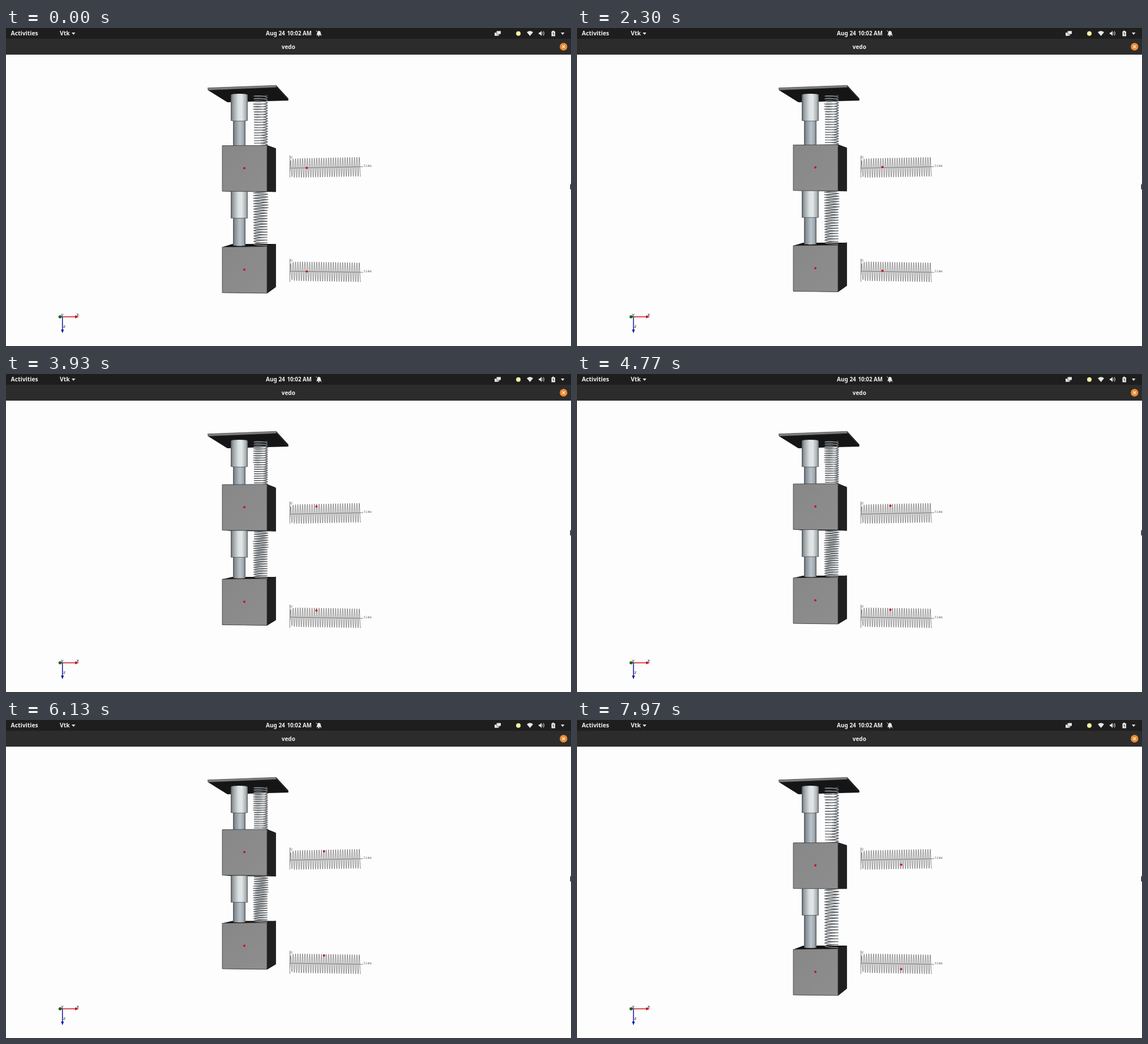
Write an HTML page that moves like this. It is 998x561 px and loops after 8 s.

```html
<!DOCTYPE html>
<html lang="en">
<head>
<meta charset="utf-8">
<title>Coupled springs</title>
<style>
  html, body { margin: 0; width: 100%; height: 100%; overflow: hidden; background: #fcfdfc; }
  svg { display: block; width: 100%; height: 100%; }
  .bar { font: 600 10.4px "Noto Sans", "Open Sans", sans-serif; fill: #f0f0f0; white-space: pre; }
  .axis { font: 6px "DejaVu Sans Mono", monospace; fill: #666; }
  .gizmo { font: 7.5px "DejaVu Sans", sans-serif; fill: #222; }
</style>
</head>
<body>
<svg viewBox="0 0 998 561" preserveAspectRatio="none">
  <defs>
    <linearGradient id="outer">
      <stop offset="0" stop-color="#4f5457"/>
      <stop offset=".12" stop-color="#929a9c"/>
      <stop offset=".45" stop-color="#dbe1e2"/>
      <stop offset=".65" stop-color="#e1e6e7"/>
      <stop offset=".9" stop-color="#a5adaf"/>
      <stop offset="1" stop-color="#5c6265"/>
    </linearGradient>
    <linearGradient id="inner">
      <stop offset="0" stop-color="#50565b"/>
      <stop offset=".15" stop-color="#858e94"/>
      <stop offset=".55" stop-color="#bac3c9"/>
      <stop offset=".85" stop-color="#9da6ac"/>
      <stop offset="1" stop-color="#545b60"/>
    </linearGradient>
    <linearGradient id="face" x2="1" y2="1">
      <stop offset="0" stop-color="#878787"/>
      <stop offset="1" stop-color="#8e8e8e"/>
    </linearGradient>
  </defs>
  <rect width="998" height="561" fill="#fcfdfc"/>

  <!-- desktop bar and window title -->
  <rect width="998" height="47" fill="#2d2c2c"/>
  <rect width="998" height="19" fill="#1f1e1e"/>
  <g class="bar">
    <text x="8.5" y="13">Activities</text>
    <text x="95" y="13">Vtk</text>
    <text x="459" y="13" font-size="10" style="font-size:10px">Aug 24</text>
    <text x="496.5" y="13" style="font-size:9.7px">10:02 AM</text>
    <text x="498.8" y="36.5" text-anchor="middle" style="font-size:10px">vedo</text>
  </g>
  <g fill="#e8e8e8">
    <path d="M116 8h6.5l-3.25 4zM980 8h6.5l-3.25 4z"/>
    <path d="M548 12.5c2-1 1-6 4-7.5 3-.5 4 2 4 4l1 3.500z"/>
    <circle cx="552.3" cy="13.600" r="1.200"/>
    <path d="M866 5.500h8v2h-2v4h-4v2.500h-5v-6h3z" opacity=".55"/>
    <path d="M867.500 5.500h6.500v5h-6.500zM863 8.500h3.500v3h4v2h-7.500z"/>
    <path d="M920 7.500q5.500-4.500 11 0l-5.500 6.500z"/>
    <path d="M941 8h2l3-3v9l-3-3h-2z"/>
    <path d="M963.500 6h1.500v-1.300h3v1.300h2v8.500h-6.500z"/>
  </g>
  <g fill="none" stroke="#e8e8e8">
    <path d="M547.500 4.500l10 9.500"/>
    <path d="M947.500 7q1.500 2.500 0 5M949.300 5.500q2.700 4 0 8" stroke-width=".9"/>
    <path d="M967 7.500l-1 2.500h2l-1 2.500" stroke="#333" stroke-width=".9"/>
  </g>
  <circle cx="905" cy="9.700" r="4" fill="#fbf3a0"/>
  <circle cx="984.800" cy="33" r="6.700" fill="#e98c33"/>
  <path d="M982.500 30.700l4.600 4.600m0-4.600l-4.600 4.600" stroke="#fff" stroke-width="1.200"/>
  <path d="M998 274l-1.400 3v7l1.400 1.500z" fill="#111"/>

  <!-- orientation axes -->
  <g class="gizmo">
    <path d="M97 509.500h26" stroke="#c4101c" stroke-width="1.500"/>
    <path d="M122 506.800l6.500 2.700-6.500 2.700z" fill="#c4101c"/>
    <path d="M99.700 510v23" stroke="#1010a8" stroke-width="1.500"/>
    <path d="M97.200 532h5l-2.500 6.500z" fill="#1010a8"/>
    <circle cx="95.500" cy="509.500" r="2.700" fill="#0a6a1c"/>
    <text x="97" y="507.500">y</text>
    <text x="124.500" y="507.500">x</text>
    <text x="101" y="528.500">z</text>
  </g>

  <!-- ceiling plate -->
  <path d="M356.500 109.500L477.500 104.500 498.500 124.500V128L391 131z" fill="#151515"/>
  <path d="M356.500 105.700L477.500 101.200V104.700L357 109.700z" fill="#808080" stroke="#333" stroke-width=".7"/>
  <path d="M477.500 101.200L498.500 124V128L477.500 105z" fill="#222"/>

  <g id="plots"></g>
  <g id="rig"></g>
</svg>
<script>
const NS = "http://www.w3.org/2000/svg";
const LOOP = 8000, FRAME = 100 / 3;
const HORIZON = 300, COILS = 20;
const PEAK_X = 536.4, WAVE = 4.17, AMP = 17;

// [ms, oscillations], including the stalls near the start
const PACE = [[0, -1.25], [1300, 0], [1400, 0], [1430, 0.08], [1570, 0.08], [1670, 0.2],
  [1830, 0.22], [3130, 1.72], [4770, 4.1], [6130, 6.08], [7270, 7.625], [8000, 8.705]];

const rig = document.getElementById("rig");
const plots = document.getElementById("plots");

function add(parent, tag, attrs, text) {
  const el = document.createElementNS(NS, tag);
  for (const k in attrs) el.setAttribute(k, attrs[k]);
  if (text) el.textContent = text;
  parent.appendChild(el);
  return el;
}
const shape = attrs => add(rig, "path", attrs);
const dot = parent => add(parent, "circle", { r: 2, fill: "#cb0a1c" });
const poly = pts => "M" + pts.map(p => p[0] + " " + p[1].toFixed(2)).join("L") + "Z";

// Half height of a level circle of radius r seen at height y
const tilt = (r, y) => r * (HORIZON - y) * 0.00074;

const backTop = y => 212.5 + 0.944 * (y - 207);
const backBottom = y => 289 + 0.9356 * (y - 288.5);

function makePlot(mid, slope, axisTop, axisBottom, labelY) {
  const midAt = x => mid + slope * (x - 564);
  let d = "";
  for (let x = 501.5; x <= 626.5; x += 0.2) {
    const grow = 1 - 0.4 * Math.exp((501 - x) / 3);
    const y = midAt(x) - AMP * grow * Math.cos(2 * Math.PI * (x - PEAK_X) / WAVE);
    d += (d ? "L" : "M") + x.toFixed(1) + " " + y.toFixed(2);
  }
  add(plots, "path", { d, fill: "none", stroke: "#505050", "stroke-width": 0.65 });
  add(plots, "path", {
    d: `M501.500 ${axisTop}V${axisBottom}M501.500 ${midAt(501)}L631 ${midAt(631)}`,
    fill: "none", stroke: "#666", "stroke-width": 0.8
  });
  add(plots, "text", { class: "axis", x: 502.2, y: axisTop + 5 }, "U");
  add(plots, "text", { class: "axis", x: 631.5, y: labelY }, "time");
  return { dot: dot(plots), midAt };
}

function makeBlock() {
  return {
    under: shape({ fill: "#151515" }),
    lid: shape({ fill: "#101010" }),
    side: shape({ fill: "#202020", stroke: "#111", "stroke-width": 0.7 })
  };
}

function makeLink() {
  return {
    rod: shape({ fill: "url(#inner)" }),
    sleeve: shape({ fill: "url(#outer)" }),
    rim: shape({ fill: "none", stroke: "#4c5255", "stroke-width": 0.9 }),
    wire: shape({ fill: "none", stroke: "#4b4f53", "stroke-width": 1.5 }),
    shine: shape({ fill: "none", stroke: "#c3c8cc", "stroke-width": 0.7 })
  };
}

function makeFront() {
  return {
    face: shape({ fill: "url(#face)", stroke: "#3a3a3a", "stroke-width": 0.8 }),
    dot: dot(rig)
  };
}

function tube(x, r, top, bottom) {
  const bend = y => 1.33 * tilt(r, y);
  return `M${x - r} ${top}C${x - r} ${top - bend(top)} ${x + r} ${top - bend(top)} ${x + r} ${top}` +
    `V${bottom}C${x + r} ${bottom + Math.abs(bend(bottom))} ${x - r} ${bottom + Math.abs(bend(bottom))} ${x - r} ${bottom}Z`;
}

function coil(top, bottom, litOnly) {
  const n = 16;
  let d = "", pen = false;
  for (let i = 0; i <= COILS * n; i++) {
    const a = i / n * 2 * Math.PI;
    const lit = Math.sin(a) < 0.15;
    if (litOnly && !lit) { pen = false; continue; }
    const base = top + (bottom - top) * i / (COILS * n);
    const x = 449.9 + 11.8 * Math.cos(a);
    const y = base + tilt(12, base) * Math.sin(a);
    d += (pen ? "L" : "M") + x.toFixed(1) + " " + y.toFixed(2);
    pen = true;
  }
  return d;
}

function setBlock(block, front, y, skew) {
  const tl = y - 39.7, tr = tl - skew, bl = y + 40.7, br = bl + skew;
  const bt = backTop(tr), bb = backBottom(br);
  block.lid.setAttribute("d", poly([[382, tl], [400, bt], [476.5, bt], [461, tr]]));
  block.under.setAttribute("d", poly([[382, bl], [400, bb - 0.3], [476.5, bb], [461, br]]));
  block.side.setAttribute("d", poly([[461, tr], [476.5, bt], [476.5, bb], [461, br]]));
  front.face.setAttribute("d", poly([[382, tl], [461, tr], [461, br], [382, bl]]));
  front.dot.setAttribute("cx", 421);
  front.dot.setAttribute("cy", y);
  return { top: (tl + bt) / 2, bottom: (bl + bb) / 2 };
}

function setLink(link, top, bottom, sleeveEnd) {
  link.rod.setAttribute("d", tube(412, 11, sleeveEnd - 3, bottom));
  link.sleeve.setAttribute("d", tube(412, 15, top, sleeveEnd));
  const bend = 1.33 * Math.abs(tilt(15, sleeveEnd));
  link.rim.setAttribute("d", `M397 ${sleeveEnd}c0 ${bend} 30 ${bend} 30 0`);
  link.wire.setAttribute("d", coil(top, bottom, false));
  link.shine.setAttribute("d", coil(top, bottom, true));
}

const plotA = makePlot(246, -0.02, 225, 264, 245.3);
const plotB = makePlot(430, 0.016, 407, 448, 431.3);
const blockA = makeBlock(), blockB = makeBlock();
const linkA = makeLink(), linkB = makeLink();
const frontA = makeFront(), frontB = makeFront();

function phaseAt(t) {
  let i = 1;
  while (i < PACE.length - 1 && t > PACE[i][0]) i++;
  const [t0, p0] = PACE[i - 1], [t1, p1] = PACE[i];
  return p0 + (p1 - p0) * (t - t0) / (t1 - t0);
}

function draw(ms) {
  const t = Math.floor((ms + 4) / FRAME) * FRAME;
  const p = phaseAt(t);
  const lift = AMP * Math.cos(2 * Math.PI * p);
  const a = setBlock(blockA, frontA, 247.3 - 0.97 * lift, 0.5);
  const b = setBlock(blockB, frontB, 426.2 - 1.91 * lift, 1);
  setLink(linkA, 118, a.top, 162.7);
  setLink(linkB, a.bottom, b.top, a.bottom + 46.7);
  const x = PEAK_X + WAVE * p;
  for (const plot of [plotA, plotB]) {
    plot.dot.setAttribute("cx", x);
    plot.dot.setAttribute("cy", plot.midAt(x) - 0.98 * lift);
  }
}

const start = performance.now();
function tick() {
  draw((performance.now() - start) % LOOP);
  requestAnimationFrame(tick);
}
draw(0);
requestAnimationFrame(tick);
</script>
</body>
</html>
```
